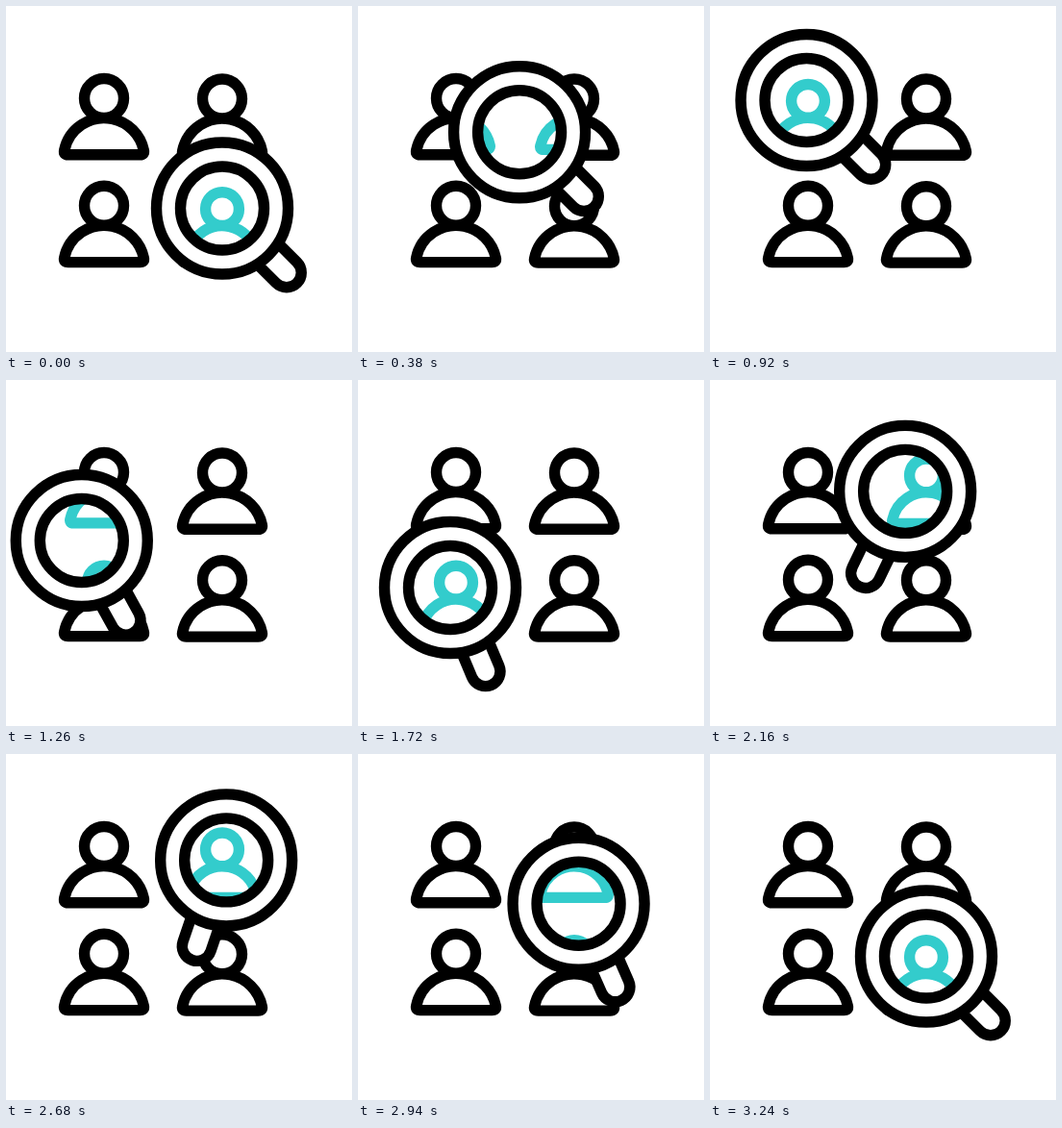
Recreate the animation shown at these times as an HTML page with a canvas. Size 360 px wide and 360 px high, loop 3.42 s.

```html
<!DOCTYPE html>
<html lang="en">
<head>
<meta charset="utf-8">
<title>People search</title>
<style>
  html, body { margin: 0; width: 100%; height: 100%; overflow: hidden; background: #fff; }
  canvas { display: block; width: 360px; height: 360px; }
</style>
</head>
<body>
<canvas id="stage" width="360" height="360"></canvas>
<script>
const ctx = document.getElementById('stage').getContext('2d');
const LOOP = 3420;
const STROKE = 11.4;
const BLACK = '#000';
const CYAN = '#33cccc';
const TURN_SHARE = 0.9; // the handle settles slightly before the lens does

// Places where the lens rests, with the direction it comes in from and goes out to.
const STOPS = [
  { arrive: -180, leave: 0, x: 225, y: 210.5, angle: 45, from: [2, -51], to: [-14, -52] },
  { arrive: 720, leave: 920, x: 100.5, y: 98, angle: 45, from: [45, 5], to: [-26, 11] },
  { arrive: 1500, leave: 1720, x: 96, y: 216, angle: 67.2, from: [-27, -35], to: [12, -39] },
  { arrive: 2320, leave: 2520, x: 225, y: 108, angle: 120.5, from: [-35, 6], to: [14, 0] }
];

const ease = s => {
  const c = Math.min(1, Math.max(0, s));
  return c * c * (3 - 2 * c);
};

const mix = (a, b, u) => a + (b - a) * u;

function bezier(p0, p1, p2, p3, u) {
  const v = 1 - u;
  return v * v * v * p0 + 3 * u * v * v * p1 + 3 * u * u * v * p2 + u * u * u * p3;
}

function lensPose(t) {
  const i = STOPS.findLastIndex(stop => stop.leave <= t);
  const a = STOPS[i];
  const b = STOPS[(i + 1) % STOPS.length];
  const arrive = b.arrive < a.leave ? b.arrive + LOOP : b.arrive;
  const s = (t - a.leave) / (arrive - a.leave);
  const u = ease(s);
  return {
    x: bezier(a.x, a.x + a.to[0], b.x + b.from[0], b.x, u),
    y: bezier(a.y, a.y + a.to[1], b.y + b.from[1], b.y, u),
    angle: mix(a.angle, b.angle, ease(s / TURN_SHARE)) * Math.PI / 180
  };
}

// The outline scales while the line keeps its weight.
function person(x, y, scale) {
  const radius = 42.2, centre = 43.7, base = 39.8;
  const tilt = Math.asin(0.2);
  const side = radius * Math.cos(tilt);
  ctx.save();
  ctx.translate(x, y);
  ctx.scale(scale, scale);
  ctx.beginPath();
  ctx.arc(0, -19, 20.5, 0, Math.PI * 2);
  ctx.closePath();
  ctx.moveTo(-side, centre - radius * 0.2);
  ctx.arc(0, centre, radius, Math.PI + tilt, -tilt);
  ctx.quadraticCurveTo(side + 1, base, side - 4, base);
  ctx.lineTo(4 - side, base);
  ctx.quadraticCurveTo(-side - 1, base, -side, centre - radius * 0.2);
  ctx.closePath();
  ctx.restore();
  ctx.stroke();
}

function people(color, scale) {
  ctx.strokeStyle = color;
  for (let row = 0; row < 2; row++) {
    for (let col = 0; col < 2; col++) {
      person(102 + 123 * col, 115 + 111.8 * row + 0.5 * col, scale);
    }
  }
}

function disc(r) {
  ctx.beginPath();
  ctx.arc(0, 0, r, 0, Math.PI * 2);
}

function handle(angle) {
  const half = 15.3, reach = 94.7;
  ctx.save();
  ctx.rotate(angle);
  ctx.beginPath();
  ctx.moveTo(62, -half);
  ctx.arc(reach, 0, half, -Math.PI / 2, Math.PI / 2);
  ctx.lineTo(62, half);
  ctx.fill();
  ctx.stroke();
  ctx.restore();
}

function magnifier({ x, y, angle }) {
  ctx.save();
  ctx.translate(x, y);
  ctx.strokeStyle = BLACK;
  handle(angle);
  disc(68.5);
  ctx.fill();
  ctx.stroke();

  ctx.save();
  disc(43);
  ctx.clip();
  ctx.translate(-x, -y);
  people(CYAN, 0.85);
  ctx.restore();

  disc(43.5);
  ctx.stroke();
  ctx.restore();
}

function draw(t) {
  ctx.fillStyle = '#fff';
  ctx.fillRect(0, 0, 360, 360);
  ctx.lineWidth = STROKE;
  ctx.lineJoin = 'round';
  people(BLACK, 1);
  magnifier(lensPose(t));
}

const start = performance.now();
function tick() {
  draw((performance.now() - start) % LOOP);
  requestAnimationFrame(tick);
}
tick();
</script>
</body>
</html>
```
